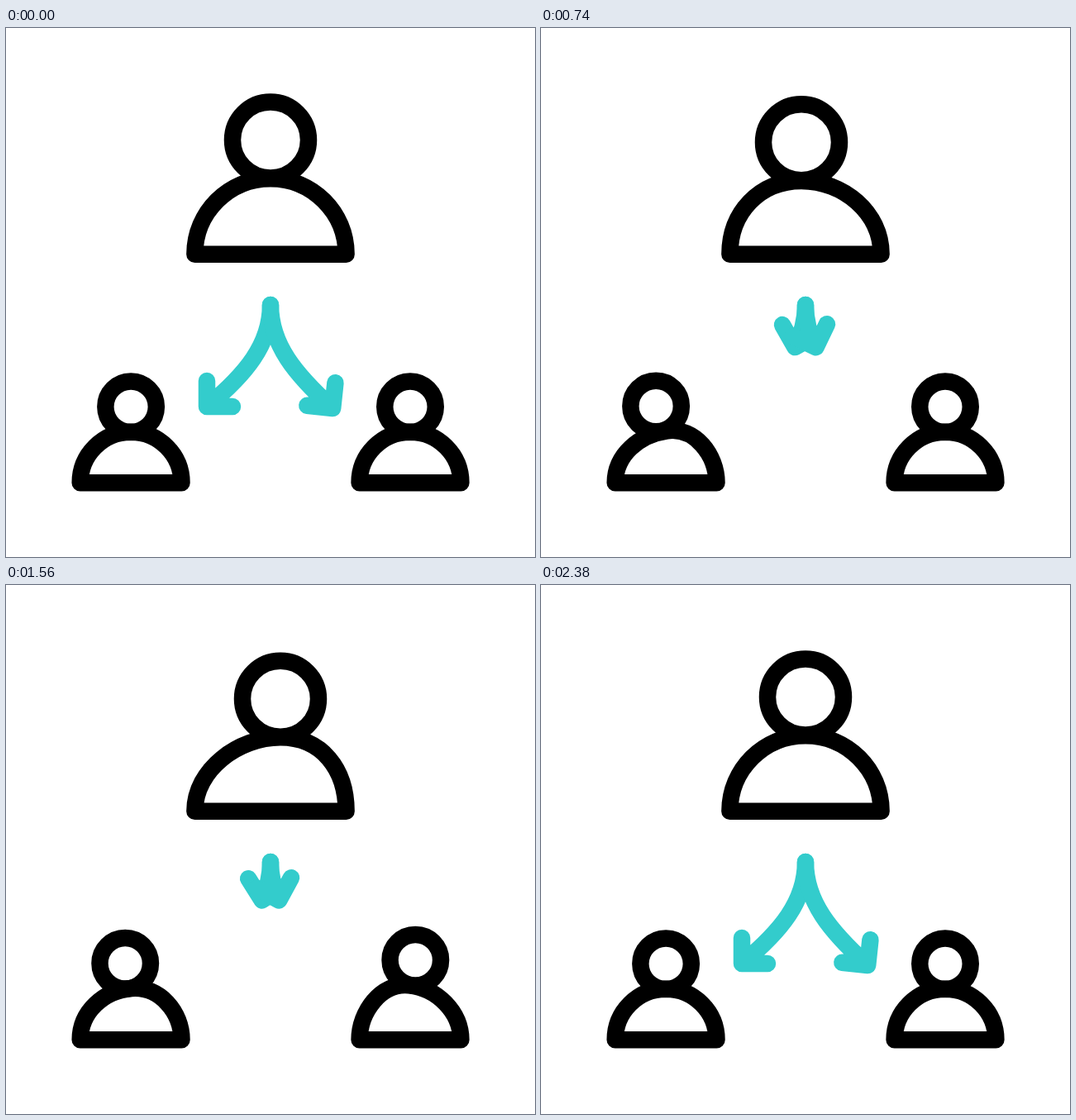
These frames come from a looping animation (640x640 px, 2.4 s). An HTML page with a canvas:

```html
<!DOCTYPE html>
<html lang="en">
<head>
<meta charset="utf-8">
<title>Delegation</title>
<style>
  html, body { margin: 0; width: 100%; height: 100%; overflow: hidden; background: #fff; }
  canvas { display: block; }
</style>
</head>
<body>
<canvas id="stage" width="640" height="640"></canvas>
<script>
const ctx = document.getElementById('stage').getContext('2d');
const LOOP = 2400;

// Sine ease from 0 to 1 between two times
function ease(t, start, end) {
  const x = Math.min(1, Math.max(0, (t - start) / (end - start)));
  return (1 - Math.cos(Math.PI * x)) / 2;
}
const mix = (a, b, k) => a + (b - a) * k;
const mixPoint = (a, b, k) => [mix(a[0], b[0], k), mix(a[1], b[1], k)];

// Head circle on a half-round body; the top of the body can shift and tilt
function person(x, base, r, headY, headR, head, top, tilt = 0) {
  const k = r * 0.5523;
  const ax = x + top[0], ay = base - r + top[1];
  const hx = k * Math.cos(tilt), hy = k * Math.sin(tilt);
  ctx.beginPath();
  ctx.moveTo(x - r, base);
  ctx.bezierCurveTo(x - r, base - k, ax - hx, ay - hy, ax, ay);
  ctx.bezierCurveTo(ax + hx, ay + hy, x + r, base - k, x + r, base);
  ctx.closePath();
  ctx.stroke();
  ctx.beginPath();
  ctx.arc(x + head[0], headY + head[1], headR, 0, 2 * Math.PI);
  ctx.stroke();
}

// Arrow cut at parameter u of its curve, drawn to the left or mirrored
function arrow(side, u, end, turn) {
  const p = [[0, 335], [0, 383], [-30, 419], end];
  const a = mixPoint(p[0], p[1], u), b = mixPoint(p[1], p[2], u), c = mixPoint(p[2], p[3], u);
  const ab = mixPoint(a, b, u), bc = mixPoint(b, c, u), tip = mixPoint(ab, bc, u);
  const arm = 31, dx = arm * Math.sin(turn), dy = arm * Math.cos(turn);
  ctx.save();
  ctx.translate(320, 0);
  ctx.scale(side, 1);
  ctx.beginPath();
  ctx.moveTo(...p[0]);
  ctx.bezierCurveTo(...a, ...ab, ...tip);
  ctx.moveTo(tip[0] - dx, tip[1] - dy);
  ctx.lineTo(...tip);
  ctx.lineTo(tip[0] + dy, tip[1] - dx);
  ctx.stroke();
  // Solid wedge between the arms while the arrow is short
  ctx.restore();
}

// The leader's head swings sideways along dipping arcs
function leaderShift(t) {
  const stops = [[0, 0], [-5, 2.8], [12, 2.2], [0, 0]];
  const spans = [[0, 430], [945, 1365], [1900, 2350]];
  let x = 0, y = 0;
  spans.forEach(([start, end], i) => {
    const e = ease(t, start, end), from = stops[i], to = stops[i + 1];
    const dip = 0.63 * Math.abs(to[0] - from[0]);
    x += (to[0] - from[0]) * e;
    y += (to[1] - from[1]) * e + dip * 4 * e * (1 - e);
  });
  return [x, y];
}

function draw(t) {
  ctx.fillStyle = '#fff';
  ctx.fillRect(0, 0, 640, 640);
  ctx.lineWidth = 20.5;
  ctx.lineCap = ctx.lineJoin = 'round';

  ctx.strokeStyle = '#000';
  const lead = leaderShift(t);
  person(320, 273.75, 91.6, 135.5, 46, lead, lead);

  const l = ease(t, 0, 450) - ease(t, 1380, 1780);
  person(151.1, 550.25, 61.4, 458.2, 30.75, [-12 * l, -0.8 * l], [1.5 * l, -1.5 * l], -0.14 * l);

  const r = ease(t, 840, 1240) - ease(t, 1900, 2350);
  person(489, 550.25, 61.4, 458.2, 30.75, [6.3 * r, -4.5 * r], [-1.5 * r, -4.5 * r], 0.1 * r);

  ctx.strokeStyle = '#33cccc';
  const q = 0.835 * (ease(t, 85, 1085) - ease(t, 1260, 2230));
  const rad = Math.PI / 180;
  arrow(1, 1 - q, [-77, 458], (33 * q + 25 * q * q) * rad);
  arrow(-1, 1 - q, [-75.2, 460], (6 + 57.5 * q ** 2.2) * rad);
}

function frame(now) {
  draw(now % LOOP);
  requestAnimationFrame(frame);
}
draw(0);
requestAnimationFrame(frame);
</script>
</body>
</html>
```
